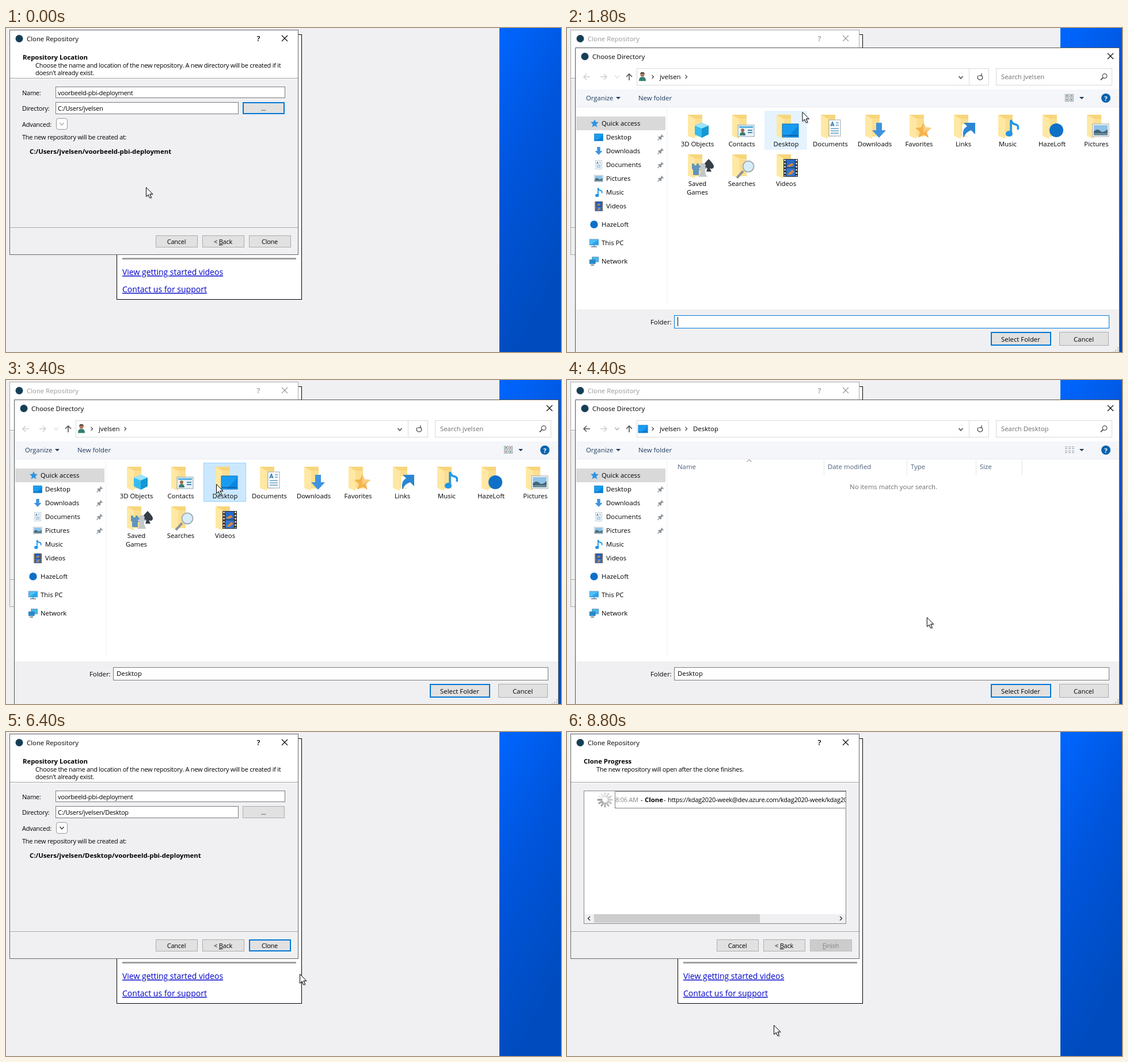
An HTML page that plays this animation: 964x564 px, repeating every 9000 ms.

```html
<!DOCTYPE html>
<html lang="en">
<head>
<meta charset="utf-8">
<title>Clone a repository</title>
<style>
  html, body { margin: 0; width: 100%; height: 100%; overflow: hidden; }
  svg { display: block; width: 964px; height: 564px; }
  text { font: 11.37px "Open Sans", "Noto Sans", sans-serif; white-space: pre; }
  .t { font-size: 11px; letter-spacing: -.26px; }
  .b { font-size: 11.35px; font-weight: 700; letter-spacing: 0; }
  .link { font-size: 14px; fill: #0000c8; text-decoration: underline; }
  .u { text-decoration: underline; }
  .mid { text-anchor: middle; }
</style>
</head>
<body>
<svg id="stage" viewBox="0 0 964 564"></svg>
<script>
const LOOP = 9000, STEP = 200;
const USER = 'jvelsen', REPO = 'voorbeeld-pbi-deployment', ORG = 'kdag2020-week';
const BLUE = '#0078d7', GREY = '#f0f0f2', CLOUD = 'HazeLoft';

// Cursor tip: time, x, y
const PATH = [
  [0, 243, 277], [200, 243, 277], [1200, 438, 140], [1600, 438, 140], [2400, 249, 178],
  [3200, 365, 181], [3800, 365, 181], [4800, 766, 539], [5600, 766, 539],
  [6400, 510, 421], [7200, 455, 368], [7600, 455, 368], [8800, 359, 510], [LOOP, 359, 510]
];

const text = (x, y, s, cls = '', fill = '#000') =>
  `<text x="${x}" y="${y}" class="${cls}" fill="${fill}">${s}</text>`;
const rect = (x, y, w, h, fill, stroke = 'none', sw = 1, rx = 0) =>
  `<rect x="${x}" y="${y}" width="${w}" height="${h}" fill="${fill}" stroke="${stroke}" stroke-width="${sw}" rx="${rx}"/>`;
// Box with a crisp border inside the given bounds
const box = (x, y, w, h, fill, stroke, sw = 1) =>
  rect(x + sw / 2, y + sw / 2, w - sw, h - sw, fill, stroke, sw);
const line = (d, stroke = '#000', w = 1) =>
  `<path d="${d}" fill="none" stroke="${stroke}" stroke-width="${w}"/>`;
const shape = (d, fill) => `<path d="${d}" fill="${fill}"/>`;
const dot = (x, y, r, fill) => `<circle cx="${x}" cy="${y}" r="${r}" fill="${fill}"/>`;
const at = (x, y, k, s) => `<g transform="translate(${x} ${y}) scale(${k})">${s}</g>`;
const closeX = (x, y, c) => line(`M${x - 5} ${y - 5}l10 10m0-10l-10 10`, c, 1.1);
const chevron = (x, y, c, w = 1.3) => line(`M${x - 3.5} ${y - 2}l3.5 4 3.5-4`, c, w);
const crumb = x => line(`M${x - 1.5} 82l3 3-3 3`, '#444', 1.2);
const caret = x => shape(`M${x - 4} 120h8l-4 4z`, '#1e395b');
const STAR = 'M0-14l4 9 10 1-8 7 3 10-9-5-9 5 3-10-8-7 10-1z';

// Icons are drawn around 0,0 in a box of about 28 units
const ICON = {
  desktop: rect(-14, -11, 28, 23, '#189cf2', '#0b6fb8') + shape('M-4 11L14-8V11z', '#0b86e0') + line('M-13 9h26', '#0a5ea5', 1.5),
  downloads: shape('M-5-13H5V0h7L0 13-12 0h7z', '#3f93e0'),
  documents: rect(-10, -14, 20, 28, '#fff', '#9aa5ae') + line('M-7 1H7M-7 5H7M-7 9H7M2-9h5M2-5h5', '#5c9ac4', 1.6) +
    line('M-7-3l3-7 3 7m-5-2h4', '#2874ad', 1.6),
  pictures: rect(-14, -11, 28, 22, '#fff', '#9ba2a8') + rect(-12, -9, 24, 18, '#8fc3e8') +
    shape('M-12 2q6-6 11-1t13-3V9h-24z', '#426779') + rect(-12, 5, 24, 4, '#6c8d9a'),
  music: line('M-2 10V-14q2 7 8 8t4 9', '#1e96ec', 3.5) +
    '<ellipse cx="-5" cy="10" rx="6" ry="5" fill="#1e96ec"/>',
  videos: rect(-12, -15, 25, 31, '#2d2b2b') + rect(-7, -14, 15, 14, '#2869c8') + rect(-7, 1, 15, 14, '#3275d5') +
    shape('M-6-3l9-5 3 4-8 3zM-5 12l8-8 4 3-7 6z', '#d28a3d') +
    '<path d="M-9.5-14V15M10.5-14V15" stroke="#ddd" stroke-width="2.5" stroke-dasharray="3 2.5"/>',
  cloud: dot(0, 0, 12, '#0f70c8'),
  cube: shape('M0-13l12 5v15L0 13-12 7V-8z', '#35bdf2') + shape('M0-13l12 5L0-3-12-8z', '#9be3fb') + shape('M0-3l12-5V7L0 13z', '#1597d4'),
  card: rect(-14, -9, 28, 20, '#eaf3f8', '#8aa3b2') + rect(-12, -7, 24, 3, '#57b1e2') +
    dot(-6, 0, 3, '#9b6a45') + shape('M-11 9q0-6 5-6t5 6z', '#3f7a70') + line('M3 0h8M3 4h8', '#4a8ab0', 2),
  star: shape(STAR, '#f6b34e') + shape('M0-14l4 9 10 1-14 8z', '#fbcf83'),
  quick: shape(STAR, '#2d94e0'),
  link: rect(-10, -10, 20, 20, '#fff', 'none') + shape('M-7-13H13V7L6 0Q-4 3-7 13-11-1-1-7z', '#2c86d2'),
  games: shape('M-15 13v-9l-2-2V-7h4v3h4v-3h4v3h3v7l-3 2v8z', '#6194bd') +
    shape('M12-15q10 10 9 14-2 5-7 2l3 6H8l2-6q-6 3-8-2 0-4 10-14z', '#353d47') +
    shape('M-6 16q5-6 4-13h-3v-3h3q-3-7 4-8 7 1 4 8h3v3H6q-1 7 4 13z', '#c5c8cb'),
  search: line('M-5 6l-11 12', '#8b9299', 4) + `<circle r="9.5" cx="4" cy="-2" fill="#d7edfa" stroke="#a4adb5" stroke-width="2"/>`,
  pc: rect(-14, -11, 28, 18, '#51bff5', '#4d7b98') + shape('M-13 7L13-10V7z', '#2ba5e8') + line('M-9 12H9M0 7v5', '#587d93', 2.5),
  net: rect(-6, -13, 20, 15, '#48b6ef', '#46738e') + rect(-14, -5, 18, 13, '#238ad0', '#46738e') + line('M-10 12H0', '#587d93', 3),
  person: dot(0, -7, 6.5, '#a8795a') + shape('M-7-9q0-6 7-6t7 6q-7-3-14 0z', '#54443a') + shape('M-11 13Q-11 0 0 0T11 13z', '#337e73'),
  pin: shape('M1-5l4 4-1 1-1-1-2 2v3l-1 1-2-2-3 3-1-1 3-3-2-2 1-1h3l2-2-1-1z', '#8b949c')
};
const icon = (kind, x, y, k = 1) => at(x, y, k, ICON[kind]);

const FILES = [
  ['3D Objects', 'cube'], ['Contacts', 'card'], ['Desktop', 'desktop'], ['Documents', 'documents'],
  ['Downloads', 'downloads'], ['Favorites', 'star'], ['Links', 'link'], ['Music', 'music'],
  [CLOUD, 'cloud'], ['Pictures', 'pictures'], ['Saved|Games', 'games'], ['Searches', 'search'], ['Videos', 'videos']
];
const PLACES = ['Desktop', 'Downloads', 'Documents', 'Pictures', 'Music', 'Videos'];

function cursorAt(t) {
  const i = PATH.findIndex(p => p[0] > t);
  const [t0, x0, y0] = PATH[i - 1], [t1, x1, y1] = PATH[i];
  const u = (t - t0) / (t1 - t0), e = u * u * (3 - 2 * u);
  return [x0 + (x1 - x0) * e, y0 + (y1 - y0) * e];
}
const inside = ([px, py], x, y, w, h) => px >= x && px < x + w && py >= y && py < y + h;

function button(x, y, w, h, label, o = {}) {
  let fill = '#e1e1e1', stroke = '#adadad', sw = 1;
  if (o.focus) [stroke, sw] = [BLUE, 2];
  if (o.hover) [fill, stroke] = ['#e5f1fb', BLUE];
  if (o.down) [fill, stroke, sw] = ['#cce4f7', '#005499', 1];
  if (o.off) [fill, stroke] = ['#cccccc', '#bfbfbf'];
  return box(x, y, w, h, fill, stroke, sw) +
    text(x + w / 2 - .5, y + h / 2 + 4.5, label, 'mid ' + (o.cls ?? 't'), o.off ? '#838383' : '#000');
}

function desktop() {
  return `<defs><linearGradient id="sky" x2=".35" y2="1">
      <stop stop-color="#0066ff"/><stop offset=".45" stop-color="#0055dc"/><stop offset="1" stop-color="#004bbd"/>
    </linearGradient><clipPath id="list"><path d="M30 103H484V333H30z"/></clipPath></defs>` +
    rect(0, 0, 964, 564, GREY) + rect(857, 0, 107, 564, 'url(#sky)') +
    box(192, 11, 322, 462, '#fff', '#000') + rect(202, 400, 302, 3, '#a0a0a0') +
    text(202, 430, 'View getting started videos', 'link') + text(202, 460, 'Contact us for support', 'link');
}

function setupPage(t, pos) {
  const moved = t >= 5600, dir = `C:/Users/${USER}${moved ? '/Desktop' : ''}`;
  return text(29, 55, 'Repository Location', 'b') +
    text(51, 69, 'Choose the name and location of the new repository. A new directory will be created if it', 't') +
    text(51, 82, "doesn't already exist.", 't') +
    text(28, 117, 'Name:', 't') + box(86, 102, 399, 20, '#fff', '#7a7a7a') + text(90, 117, REPO, 't') +
    text(28, 144, 'Directory:', 't') + box(86, 129, 318, 21, '#fff', '#7a7a7a') + text(90, 144, dir, 't') +
    button(411, 129, 73, 21, '...', { focus: t < 1600, hover: t < 1600 && inside(pos, 411, 129, 73, 21) }) +
    text(28, 172, 'Advanced:', 't') + rect(87.5, 157.5, 19, 19, '#fdfdfd', '#9a9a9a', 1, 3.5) +
    chevron(97, 167, moved ? '#333' : '#aaa') +
    text(28, 194, 'The new repository will be created at:', 't') + text(41, 219, `${dir}/${REPO}`, 'b');
}

function progressPage(t) {
  const turn = (t - 8800) / 100;
  let spokes = '';
  for (let i = 0; i < 12; i++) {
    const g = 150 + i * 8;
    spokes += `<path d="M6 0H12" stroke="rgb(${g},${g},${g})" stroke-width="3" stroke-linecap="round" transform="rotate(${180 - 30 * i + 30 * turn})"/>`;
  }
  return text(29, 55, 'Clone Progress', 'b') +
    text(51, 69, 'The new repository will open after the clone finishes.', 't') +
    box(29, 102, 456, 232, '#fff', '#828790') + at(66, 118, 1, spokes) +
    `<g clip-path="url(#list)"><path d="M490 103.5H83.5V132.5H490" fill="none" stroke="#000" stroke-dasharray="1 1"/>` +
    text(84, 122, '8:06 AM', 't', '#858585') + text(128, 122, '-', 't') + text(135, 122, 'Clone', 'b') +
    text(168, 122, '-', 't') + text(175, 122, `https://${ORG}@dev.azure.com/${ORG}/${ORG}`, 't') + '</g>' +
    rect(30, 317, 454, 16, GREY) + rect(47, 317, 288, 15, '#cdcdcd') +
    line('M40 321l-3.5 3.5 3.5 3.5M474 321l3.5 3.5-3.5 3.5', '#444', 1.6);
}

function cloneWindow(t, pos) {
  const active = t < 1600 || t >= 5600, ink = active ? '#000' : '#999', busy = t >= 7800;
  const overClone = inside(pos, 422, 361, 73, 21);
  return box(6, 3, 502, 392, GREY, active ? '#666' : '#a8a8a8') + rect(7, 4, 500, 83, '#fff') +
    line('M7 87.5H507M7 347.5H507', '#a0a0a0') + line('M7 88.5H507M7 348.5H507', '#fff') +
    dot(23, 18.5, 6.5, '#153f56') + text(36, 23, 'Clone Repository', '', ink) +
    `<text x="438.5" y="23" class="mid" style="font-size:13px;font-weight:600" fill="${ink}">?</text>` + closeX(484, 18, ink) +
    (busy ? progressPage(t) : setupPage(t, pos)) +
    button(260, 361, 73, 21, 'Cancel') +
    button(341, 361, 73, 21, '&lt; <tspan class="u">B</tspan>ack') +
    (busy ? button(422, 361, 73, 21, '<tspan class="u">F</tspan>inish', { off: true })
          : button(422, 361, 73, 21, 'Clone', { focus: t >= 5600, hover: t >= 5600 && overClone, down: t >= 7600 }));
}

function fileGrid(t, pos) {
  return FILES.map(([name, kind], i) => {
    const c = 226 + 77 * (i % 10), y = i < 10 ? 0 : 69;
    const chosen = i === 2 && t >= 3400, hover = inside(pos, c - 37, 144 + y, 74, 68);
    return (chosen ? box(c - 37, 144 + y, 74, 68, '#cce8ff', '#99d1ff') : hover ? rect(c - 37, 144 + y, 74, 68, '#e5f3ff') : '') +
      at(c, y, 1, shape('M-16 151H9V189H-8z', '#f7d57b') + shape('M-16 151l12 7V193L-16 188z', '#ffe8a3') + shape('M-4 158H9V189H-4z', '#fbdf90')) +
      icon(kind, c + 8, (kind === 'games' || kind === 'videos' || kind === 'search' ? 174 : kind === 'documents' || kind === 'music' ? 174 : 178) + y) +
      name.split('|').map((s, k) => text(c + .5, 206 + y + 15 * k, s, 'mid')).join('');
  }).join('');
}

function emptyList() {
  const ink = '#4c607a';
  return text(192, 155, 'Name', '', ink) + text(453, 155, 'Date modified', '', ink) +
    text(597, 155, 'Type', '', ink) + text(717, 155, 'Size', '', ink) +
    line('M446.5 139V165M590.5 139V165M710.5 139V165M790.5 139V165', '#e5e5e5') +
    line('M312.5 142.5l4-4 4 4', '#666') +
    text(567, 190, 'No items match your search.', 'mid', '#6d6d6d');
}

function sidebar() {
  return rect(16, 154, 155, 24, '#d9d9d9') + line('M173.5 139V480', '#f0f0f0') +
    icon('quick', 48, 166, .5) + text(60, 170, 'Quick access') +
    PLACES.map((s, i) => icon(s.toLowerCase(), 55, 190 + 24 * i, .54) + text(68, 194 + 24 * i, s) +
      (i < 4 ? icon('pin', 163, 190 + 24 * i) : '')).join('') +
    [[CLOUD, 'cloud'], ['This PC', 'pc'], ['Network', 'net']].map(([s, k], i) =>
      icon(k, 47, 342 + 32 * i, .56) + text(60, 346 + 32 * i, s)).join('');
}

function chooserBody(t, pos) {
  const open = t >= 3800, chosen = t >= 3400, over = inside(pos, 736, 529, 105, 24);
  const arrow = '#555', faint = '#cfcfcf', place = open ? 'Desktop' : USER;
  let view = '';
  for (let r = 0; r < 2; r++)
    for (let c = 0; c < 2; c++)
      view += box(865 + 8 * c, 115 + 7 * r, 7, 6, '#fff', '#8c99a5') + rect(867 + 8 * c, 117 + 7 * r, 3, 2, c === r ? '#4c8c68' : '#b0705a');
  if (open) view = line('M865 116.5h4m2 0h4m2 0h4M865 119.5h4m2 0h4m2 0h4M865 123.5h4m2 0h4m2 0h4M865 126.5h4m2 0h4m2 0h4', '#8995a0');
  return rect(15, 65, 944, 425, '#fff') + rect(15, 490, 944, 74, GREY) +
    line('M40 85H29m5-5l-5 5 5 5', open ? arrow : faint, 1.5) + line('M58 85h11m-5-5l5 5-5 5', faint, 1.5) +
    chevron(87, 85, open ? '#888' : faint, 1.1) + line('M108 91V80m-5 5l5-5 5 5', arrow, 1.6) +
    box(121, 70, 578, 30, '#fff', '#d9d9d9') + box(698, 70, 35, 30, '#fff', '#d9d9d9') +
    (open ? icon('desktop', 132, 85, .58) : icon('person', 131, 85, .55)) +
    crumb(149) + text(161, 89, USER) + crumb(207) + (open ? text(219, 89, 'Desktop') : '') +
    chevron(684, 86, '#555', 1.7) + line('M720 82.5a4.3 4.3 0 1 1-5 0M720 79v4h-4', '#555', 1.4) +
    box(745, 70, 202, 30, '#fff', '#d9d9d9') + text(754, 89, 'Search ' + place, '', '#6d6d6d') +
    `<circle cx="934" cy="83.5" r="3.8" fill="none" stroke="#555" stroke-width="1.3"/>` + line('M931 86.5l-4 4', '#555', 1.8) +
    rect(15, 107, 944, 30, '#f5f6fa') + line('M15 137.5H959', '#e6e9f0') +
    text(33, 126, 'Organize', '', '#1e395b') + caret(89) + text(124, 126, 'New folder', '', '#1e395b') +
    view + caret(894) + dot(936, 122, 8, '#0a63ae') +
    `<text x="936" y="126.5" class="mid" font-weight="700" style="font-weight:700" fill="#fff">?</text>` +
    sidebar() + (open ? emptyList() : fileGrid(t, pos)) +
    text(145, 516, 'Folder:') + box(186, 500, 756, 23, '#fff', chosen ? '#7a7a7a' : BLUE) +
    (chosen ? text(192, 515, 'Desktop') : line('M192.5 503V519')) +
    button(736, 529, 105, 24, 'Select Folder', { focus: true, hover: over, down: t >= 5400, cls: '' }) +
    button(855, 529, 86, 24, 'Cancel', { cls: '' }) +
    line('M956 557h2M952 561h2m2 0h2M948 564h2m2 0h2m2 0h2', '#b8b8b8', 2);
}

function chooser(t, pos) {
  return rect(15, 35, 944, 30, '#fff') + (t >= 1800 ? chooserBody(t, pos) : '') +
    line('M14.5 564V34.5H959.5V564', '#555') +
    dot(31, 49.5, 6.5, '#153f56') + text(44, 54, 'Choose Directory') + closeX(944, 49, '#000');
}

function pointer([x, y]) {
  const d = 'M.5.5V16.5L4.2 13 6.8 19 9.4 17.9 6.8 12H11.8z';
  return at(x, y, 1, `<path d="${d}" transform="translate(2 2)" opacity=".2"/><path d="${d}" fill="#fff" stroke="#000"/>`);
}

const stage = document.getElementById('stage');
let shown = -1;
function draw(now) {
  const t = Math.floor(now % LOOP / STEP) * STEP;
  if (t !== shown) {
    shown = t;
    const pos = cursorAt(t);
    stage.innerHTML = desktop() + cloneWindow(t, pos) + (t >= 1600 && t < 5600 ? chooser(t, pos) : '') + pointer(pos);
  }
  requestAnimationFrame(() => draw(performance.now() - start));
}
const start = performance.now();
draw(0);
</script>
</body>
</html>
```
